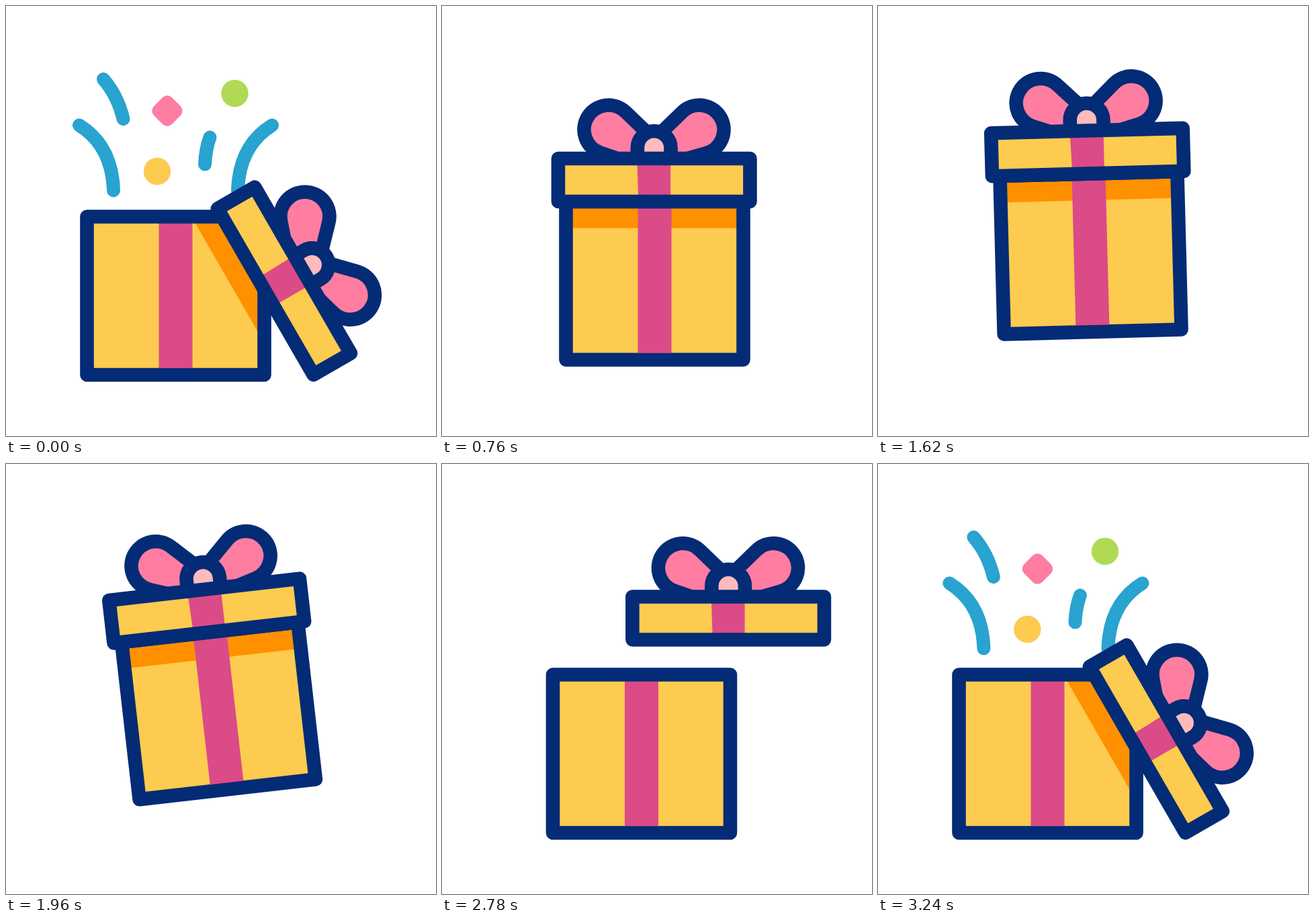
An HTML page that plays this animation: 640x640 px, repeating every 3.62 s.

```html
<!DOCTYPE html>
<html lang="en">
<head>
<meta charset="utf-8">
<title>Gift box</title>
<style>
  html, body { margin: 0; width: 100%; height: 100%; overflow: hidden; background: #fff; }
  svg { display: block; width: 100%; height: 100%; }
  .line { stroke: #042b75; stroke-width: 20.6; stroke-linejoin: round; }
  .streak { fill: none; stroke: #29a3cf; stroke-width: 20; stroke-linecap: round; }
</style>
</head>
<body>
<svg viewBox="0 0 640 640">
  <clipPath id="inside"><rect x="184.5" y="313.5" width="264" height="235.5"/></clipPath>

  <g id="confetti">
    <path class="streak" pathLength="1" d="M145 109Q166 133 174.500 168"/>
    <path class="streak" pathLength="1" d="M109 177.500Q158 208 160 274.500"/>
    <path class="streak" pathLength="1" d="M303.500 195.500Q297 213 296 235.500"/>
    <path class="streak" pathLength="1" d="M396 177.500Q347 208 345 274.500"/>
    <circle class="dot" cx="340.500" cy="130" r="20.200" fill="#b0da53"/>
    <g class="dot"><rect x="221" y="137" width="38" height="38" rx="10" fill="#ff7da1" transform="rotate(45 240 156)"/></g>
    <circle class="dot" cx="225" cy="246" r="20.200" fill="#fdcb50"/>
  </g>

  <g id="gift">
    <rect x="184.500" y="313.500" width="264" height="235.500" fill="#fdcb50"/>
    <g clip-path="url(#inside)"><rect id="shade" x="-153" y="0" width="306" height="71.600" fill="#ff9000"/></g>
    <rect x="291.500" y="313.500" width="50" height="235.500" fill="#db4b87"/>
    <rect class="line" x="184.500" y="313.500" width="264" height="235.500" fill="none"/>
    <rect x="291.500" y="537" width="50" height="2" fill="#db4b87"/>

    <g id="lid">
      <g class="line" fill="#ff7da1">
        <path d="M0-60.500L-42.500-101.300A36.500 36.500 0 1 0-79.600-40.400L0-13Z"/>
        <path d="M0-60.500L42.100-101.300A36.500 36.500 0 1 1 77.300-39.800L0-17.700Z"/>
        <path fill="#ffbbbb" d="M-24.800-30V-48A24.800 24.800 0 0 1 24.800-48V-30Z"/>
      </g>
      <rect x="-142.750" y="-32" width="285.500" height="64" fill="#fdcb50"/>
      <path fill="#db4b87" d="M-25.200-24H24.500V24H-23.600Z"/>
      <rect class="line" x="-142.750" y="-32" width="285.500" height="64" fill="none"/>
    </g>
  </g>
</svg>
<script>
const LOOP = 3620, STEP = 20;
const $ = id => document.getElementById(id);
const streaks = document.querySelectorAll('.streak');
const dots = document.querySelectorAll('.dot');

const ramp = (t, a, b) => Math.min(1, Math.max(0, (t - a) / (b - a)));
const ease = (t, a, b) => { const u = ramp(t, a, b); return u * u * (3 - 2 * u); };

// Eased value through [time, value] keys
function track(t, keys) {
  let v = keys[0][1];
  for (let i = 1; i < keys.length; i++)
    v += (keys[i][1] - keys[i - 1][1]) * ease(t, keys[i - 1][0], keys[i][0]);
  return v;
}

// Lid poses relative to the box: leaning, hovering, closed
const lidTrack = (t, lean, hover, shut) => track(t,
  [[0, lean], [400, hover], [600, shut], [2600, shut], [2800, hover], [3200, lean]]);

function drawConfetti(t) {
  const opening = t > 1000;
  $('confetti').setAttribute('transform', `translate(${opening ? -2.6 : 0} 0)`);

  streaks.forEach((el, i) => {
    const shown = opening ? ease(t, 2840 + i * 20, 3140 + i * 20) : 1 - ease(t, 0, 320);
    el.style.visibility = shown > 0.01 ? 'visible' : 'hidden';
    el.setAttribute('stroke-dasharray', `${shown} 3`);
    el.setAttribute('stroke-dashoffset', opening ? shown - 1 : 0);
  });

  dots.forEach((el, i) => {
    const end = 400 + i * 20;
    const y = opening ? 60 * (1 - ease(t, 2820, 3200)) : -37.5 * ease(t, 0, end);
    el.setAttribute('transform', `translate(0 ${y})`);
    el.setAttribute('opacity', opening ? ramp(t, 2840, 3100) : 1 - ramp(t, 0, end));
  });
}

function draw(t) {
  const x = track(t, [[0, -64], [400, 0], [2560, 0], [3160, -64]]);
  const y = track(t, [[600, 0], [1000, -64], [2200, -64], [2600, 0]]);
  const tilt = track(t, [[1000, 0], [1400, 10], [1800, -10], [2200, 0]]);
  $('gift').setAttribute('transform', `translate(${x} ${y}) rotate(${tilt} 316.5 432)`);

  const lidX = 315.7 + lidTrack(t, 162.2, 133.7, 0);
  const lidY = 281.5 + lidTrack(t, 127.8, -53.5, 0);
  const pose = `translate(${lidX} ${lidY}) rotate(${lidTrack(t, 60, 0, 0)})`;
  $('lid').setAttribute('transform', pose);
  $('shade').setAttribute('transform', pose);

  drawConfetti(t);
}

const start = performance.now();
function tick() {
  const t = (performance.now() - start) % LOOP;
  draw(Math.floor(t / STEP) * STEP);
  requestAnimationFrame(tick);
}
tick();
</script>
</body>
</html>
```
